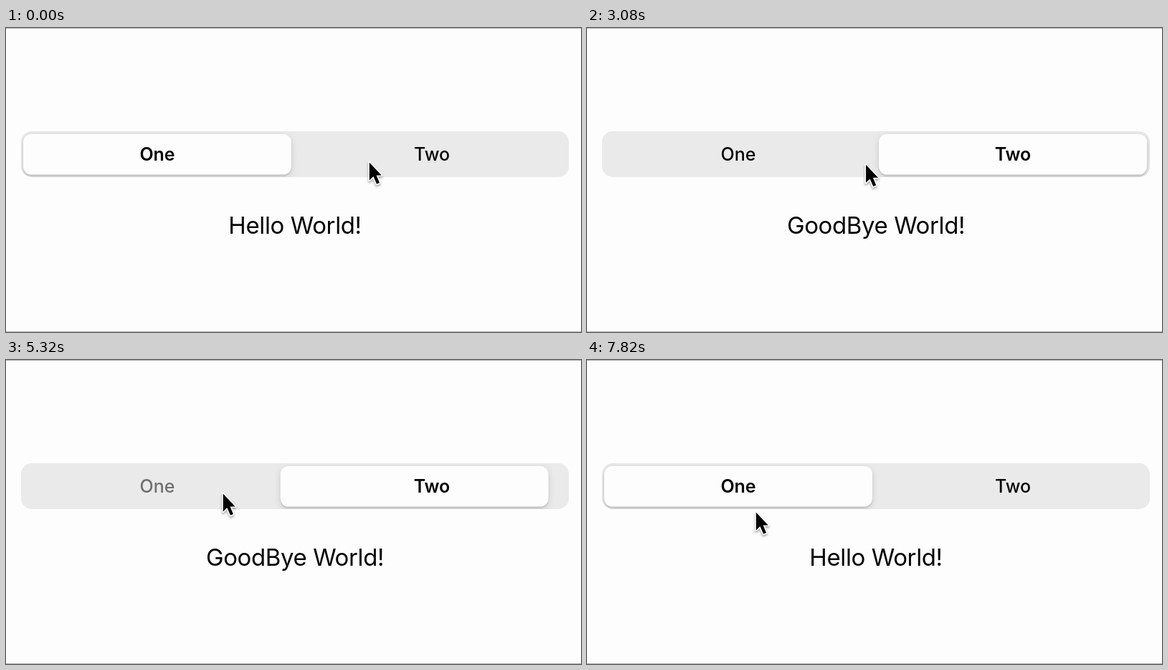
Animation of 802x424 px, one loop 7.92 s. Source, as an HTML page:

```html
<!DOCTYPE html>
<html lang="en">
<head>
<meta charset="utf-8">
<title>Segmented control</title>
<style>
  html, body { margin: 0; width: 100%; height: 100%; overflow: hidden; background: #fdfdfd; }
  svg { display: block; width: 802px; height: 424px; }
  text { font-family: Inter, "Liberation Sans", sans-serif; text-anchor: middle; fill: #050505; }
  .label { font-size: 25px; font-weight: 450; }
  .bold { font-weight: 600; letter-spacing: -.1px; }
  .title { font-size: 33px; letter-spacing: -.4px; }
  #thumb { filter: drop-shadow(0 2px 1px rgba(0, 0, 0, .12)) drop-shadow(0 3px 5px rgba(0, 0, 0, .12)); }
  #cursor { filter: drop-shadow(0 2px 1.5px rgba(0, 0, 0, .35)); }
</style>
</head>
<body>
<svg viewBox="0 0 802 424">
  <clipPath id="bar"><rect x="21" y="144" width="764" height="64" rx="15"/></clipPath>
  <path d="M0 .5H802M0 423.5H802" stroke="#b0b0b0"/>
  <g clip-path="url(#bar)">
    <rect x="21" y="144" width="764" height="64" fill="#eaeaea"/>
    <rect id="thumb" y="148" width="374" height="56.5" rx="11.5" fill="#fdfdfd"/>
  </g>
  <g id="one">
    <text class="label" x="211" y="185">One</text>
    <text class="label bold" x="211" y="185">One</text>
  </g>
  <g id="two">
    <text class="label" x="594" y="185">Two</text>
    <text class="label bold" x="594" y="185">Two</text>
  </g>
  <text id="title" class="title" x="403" y="286.5"></text>
  <path id="cursor" d="M0 0V25L5.6 19.6L10.2 30.2L14.2 28.5L9.8 18H17Z"
        stroke="#fff" stroke-width="3.4" stroke-linejoin="round" paint-order="stroke"/>
</svg>
<script>
const LOOP = 7920;
const LEFT = 24, RIGHT = 407;
// press and release times: to Two, back to One
const TAPS = [{ down: 1140, up: 1320 }, { down: 4780, up: 5270 }];
const SWAP = 640;                   // title changes this long after a release
const $ = id => document.getElementById(id);
const clamp = v => Math.min(1, Math.max(0, v));
const ramp = (t, a, b) => clamp((t - a) / (b - a));
const ease = p => p * p * (3 - 2 * p);

// time, x, y of the pointer tip
const PATH = [
  [0, 506, 186], [1940, 506, 186], [2400, 460, 187], [3520, 342, 191],
  [3760, 329, 188], [4360, 303, 185], [4620, 302, 185],
  [6400, 302, 185], [7820, 235, 211], [LOOP, 235, 211]
];

function pointer(t) {
  const i = PATH.findIndex(p => p[0] > t);
  const [t0, x0, y0] = PATH[i - 1], [t1, x1, y1] = PATH[i];
  const p = ramp(t, t0, t1);
  return [x0 + (x1 - x0) * p, y0 + (y1 - y0) * p];
}

// critically damped spring
function spring(ms) {
  const s = Math.max(0, ms) * .008;
  return 1 - (1 + s) * Math.exp(-s);
}

// label fades while held and recovers after release
function dim(t, { down, up }) {
  const held = .6 * ease(ramp(Math.min(t, up), down, down + 400));
  return 1 - held * (1 - ramp(t, up, up + 240));
}

function label(id, bold, alpha) {
  const g = $(id), [thin, thick] = g.children;
  g.setAttribute("opacity", alpha);
  thin.setAttribute("opacity", 1 - bold);
  thick.setAttribute("opacity", bold);
}

function draw(t) {
  const [a, b] = TAPS.map(tap => t - tap.up);
  $("thumb").setAttribute("x", LEFT + (RIGHT - LEFT) * (spring(a) - spring(b)));

  const bold = ramp(a, 60, 420) - ramp(b, 60, 420);
  label("one", 1 - bold, dim(t, TAPS[1]));
  label("two", bold, dim(t, TAPS[0]));

  const words = a >= SWAP && b < SWAP ? "GoodBye World!" : "Hello World!";
  if ($("title").textContent !== words) $("title").textContent = words;

  const [x, y] = pointer(t);
  $("cursor").setAttribute("transform", `translate(${x + .8} ${y + 1.4})`);
}

const start = performance.now();
function tick() {
  draw((performance.now() - start) % LOOP);
  requestAnimationFrame(tick);
}
tick();
</script>
</body>
</html>
```
